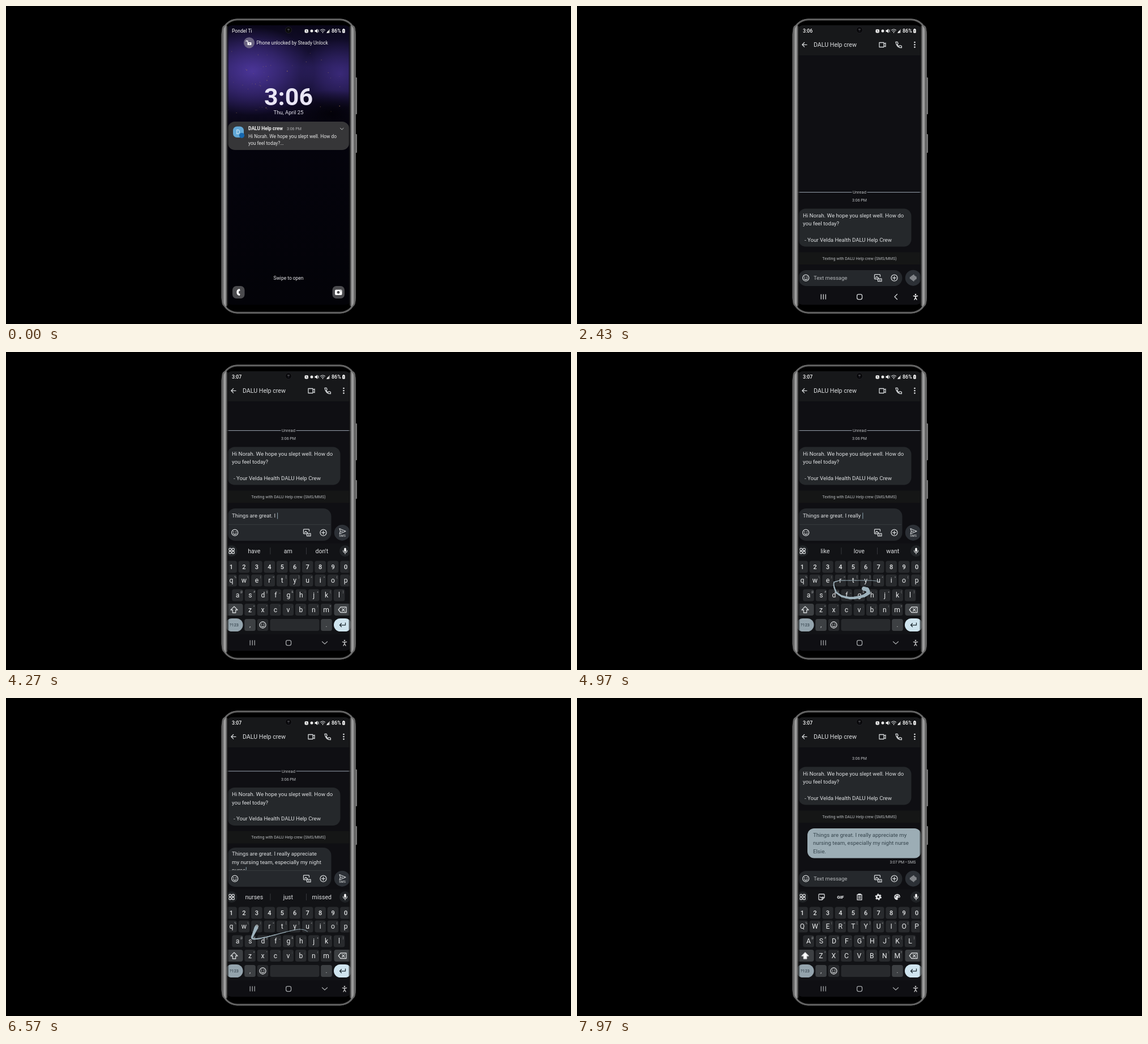
Animation, 998 px wide and 561 px high, one loop 8000 ms. Source, as an HTML page:

```html
<!DOCTYPE html>
<html lang="en">
<head>
<meta charset="utf-8">
<title>Care message</title>
<style>
  html, body { margin: 0; width: 100%; height: 100%; overflow: hidden; background: #000; }
  svg { display: block; width: 100vw; height: 100vh; }
  text { font-family: Roboto, Inter, sans-serif; white-space: pre; }
  .line { fill: none; stroke: #d5d8da; stroke-width: 1.3; stroke-linecap: round; stroke-linejoin: round; }
</style>
</head>
<body>
<svg id="stage" viewBox="0 0 998 561"></svg>
<script>
const LOOP = 8000;
const TEAM = 'DALU Help crew';
const INK = '#dfe1e3';
const BG = '#0f0f13';

// Drawing helpers; text is placed by its vertical middle.
const text = (x, y, s, size, fill = INK, anchor = 'start', more = '') =>
  `<text x="${x}" y="${y + size * 0.355}" font-size="${size}" fill="${fill}" text-anchor="${anchor}" ${more}>${s.replace(/&/g, '&amp;').replace(/</g, '&lt;')}</text>`;
const mid = (x, y, s, size, fill, more) => text(x, y, s, size, fill, 'middle', more);
const rect = (x, y, w, h, r, fill, more = '') =>
  `<rect x="${x}" y="${y}" width="${w}" height="${h}" rx="${r}" fill="${fill}" ${more}/>`;
const dot = (x, y, r, fill, more = '') => `<circle cx="${x}" cy="${y}" r="${r}" fill="${fill}" ${more}/>`;
const line = (d, more = '') => `<path class="line" d="${d}" ${more}/>`;
const solid = (d, fill = '#fff') => `<path d="${d}" fill="${fill}"/>`;
const group = (id, body, more = '') => `<g id="${id}" ${more}>${body}</g>`;
const at = (x, y, body) => `<g transform="translate(${x} ${y})">${body}</g>`;
const bold = 'font-weight="500"';

const smiley = line('M-5.5 0a5.5 5.5 0 1 0 11 0a5.5 5.5 0 1 0-11 0M-2.6 1.6q2.6 3 5.2 0') +
  dot(-2, -1.4, 0.9, INK) + dot(2, -1.4, 0.9, INK);
const handset = 'M-5-5h3l1.2 3-1.6 1.6a9 9 0 0 0 3.2 3.2l1.6-1.6 3 1.2v3q-9 0-10.4-10.4z';

function defs() {
  const stops = list => list.map(([o, c, a = 1]) =>
    `<stop offset="${o}" stop-color="${c}" stop-opacity="${a}"/>`).join('');
  const edge = [[0, '#3c3c3c'], [.2, '#6b6b6b'], [.36, '#a8a8a8'], [.58, '#858585'], [.8, '#1c1c1c', .75], [1, '#000', 0]];
  const glow = (id, c, a) => `<radialGradient id="${id}">${stops([[0, c, a], [.5, c, a * .55], [1, c, 0]])}</radialGradient>`;
  return `<defs>
    <linearGradient id="body">${stops([[0, '#444'], [.02, '#999'], [.05, '#5c5c5c'], [.5, '#555'], [.95, '#5c5c5c'], [.98, '#999'], [1, '#444']])}</linearGradient>
    <linearGradient id="edge">${stops(edge)}</linearGradient>
    <linearGradient id="night" x2="0" y2="1">${stops([[0, '#0a0719'], [.15, '#1b1440'], [.26, '#140e30'], [.38, '#04030c'], [1, '#030308']])}</linearGradient>
    ${glow('violet', '#5a40b4', .75)}${glow('shade', '#020106', .9)}
    <clipPath id="screen"><rect x="387" y="34" width="224" height="493" rx="13"/></clipPath>
    <clipPath id="composeClip"><rect x="392" y="240" width="182" height="63.5"/></clipPath>
  </defs>`;
}

function lockScreen() {
  let seed = 7;
  const rnd = () => (seed = seed * 16807 % 2147483647) / 2147483647;
  let stars = '';
  for (let i = 0; i < 46; i++) {
    const x = i < 32 ? 393 + 75 * rnd() : 470 + 135 * rnd();
    stars += dot(x, 80 + 112 * rnd(), 0.35 + 0.4 * rnd(), '#b08a58', `opacity="${0.3 + 0.6 * rnd()}"`);
  }
  const tile = x => rect(x, 494, 21.5, 22, 7, '#4b4b4e');
  return rect(387, 34, 224, 493, 0, 'url(#night)') +
    '<ellipse cx="435" cy="115" rx="110" ry="78" fill="url(#violet)"/>' +
    '<ellipse cx="590" cy="120" rx="70" ry="62" fill="url(#violet)" opacity=".65"/>' +
    '<ellipse cx="575" cy="190" rx="85" ry="42" fill="url(#shade)"/>' + stars +
    text(399, 44, 'Pondel Ti', 8.6, '#fff') +
    dot(429.5, 64.8, 9.6, '#77718b', 'opacity=".85"') + rect(426.5, 64, 7, 5, 1, '#fff') +
    line('M427 64v-2a2 2 0 0 0-3 0', 'style="stroke:#fff"') + dot(430, 66.5, .9, '#6b6680') +
    text(442.5, 65, 'Phone unlocked by Steady Unlock', 8.45, '#eee') +
    mid(499, 159.5, '3:06', 43, '#e9e6f5', 'font-weight="600"') +
    mid(499, 187.5, 'Thu, April 25', 9.5, '#e6e4ee') +
    rect(391.5, 204, 215, 50, 13, '#363638') +
    rect(401, 212.5, 19, 19.5, 7, '#62a8d6') + mid(410, 222, 'D', 10.5, '#e8f4fb') +
    dot(416.5, 228.3, 4.6, '#1667ae') +
    text(428, 216.5, TEAM, 8.45, '#f2f2f2', 'start', 'font-weight="700"') +
    text(496, 216.8, '3:06 PM', 7, '#b5b5b7') + line('M590.5 215.5l2.8 2.6 2.8-2.6', 'style="stroke-width:.9"') +
    text(428, 230, 'Hi Norah. We hope you slept well. How do', 8.45, '#e6e6e6') +
    text(428, 242, 'you feel today?...', 8.45, '#e6e6e6') +
    mid(499, 480.5, 'Swipe to open', 8.45, '#e6e6e8') +
    tile(400) + solid('M412.8 499q-5.5.5-5.5 6t5.5 6.2l.8-3.3-2.3-1q-.6-1.9 0-3.8l2.3-.9z') +
    tile(576.5) + rect(581, 500.5, 12.6, 9.5, 2, '#fff') + dot(587, 505.2, 2.4, '#4b4b4e') + dot(591.6, 502.5, .8, '#4b4b4e');
}

function conversation() {
  const rule = x => rect(x, 328, 97, 1.1, 0, '#8f98a3');
  return group('unread', rule(388.5) + rule(512.5) + mid(499, 328.6, 'Unread', 7.5, '#b9bcbf')) +
    mid(499, 343, '3:06 PM', 7, '#c3c6c8') +
    rect(391, 357.5, 199.5, 67, 13, '#25282b') +
    text(399, 369.5, 'Hi Norah. We hope you slept well. How do', 9.64) +
    text(399, 384, 'you feel today?', 9.64) +
    text(402, 412.5, `- Your Velda Health ${TEAM.replace('c', 'C')}`, 9.64) +
    rect(388, 434.5, 222, 21.5, 0, '#151616') +
    mid(499, 445, `Texting with ${TEAM} (SMS/MMS)`, 7.1, '#b7babd') +
    group('sent', rect(407, 466, 201, 52.5, 12, '#9cadb5') +
      ['Things are great. I really appreciate my', 'nursing team, especially my night nurse', 'Elsie.']
        .map((s, i) => text(417, 477.5 + 14.4 * i, s, 9.64, '#36454d')).join('') +
      text(598.5, 525.5, '3:07 PM • SMS', 7, '#c3c6c8', 'end'));
}

function header() {
  return rect(380, 20, 240, 67, 0, '#17181a') +
    line('M406 68.3h-8m3.6-3.8l-3.8 3.8 3.8 3.8') + text(418, 68.3, TEAM, 10.65) +
    line('M534 64.5h8v8h-8zM542 67l3-1.8v6.6l-3-1.8') +
    at(568, 68.3, line(handset)) +
    [64, 68.3, 72.6].map(y => dot(596.5, y, 1.3, INK)).join('');
}

function compose() {
  const wave = [3, 6, 9, 11, 7, 4].map((h, i) => `M${-5 + 2 * i} ${-h / 2}v${h}`).join('');
  return '<rect id="field" x="391" width="183.5" rx="14" fill="#25282c"/>' +
    group('draft', [0, 1, 2].map(() => text(399, 0, '', 9.64)).join('') + rect(0, 0, .8, 11, 0, '#a9c3d2', 'id="cursor"'),
      'clip-path="url(#composeClip)"') +
    group('controls', rect(393, -14.8, 180, .8, 0, '#3b3f42', 'id="divider"') +
      at(404.2, 0, smiley) +
      at(531.5, 0, line('M1-.2V1a1 1 0 0 1-1 1h-5a1 1 0 0 1-1-1v-6a1 1 0 0 1 1-1H3a1 1 0 0 1 1 1v2.5M-4 0l2-2.5 2 2M0 1.5h6.5v4.5H0z') + dot(3.3, 3.8, 1, INK)) +
      at(560.5, 0, line('M-5.5 0a5.5 5.5 0 1 0 11 0a5.5 5.5 0 1 0-11 0M-2.8 0h5.6M0-2.8v5.6')) +
      dot(593.8, 0, 14, '#2c3036') +
      group('hint', text(418, 0, 'Text message', 9.55, '#b5b8bb') + at(593.8, 0, line(wave, 'style="stroke-width:1"'))) +
      group('send', at(594, -2.5, line('M-5-4.6L6 0-5 4.6-3.5 0zM-3.5 0h4', 'style="stroke-width:1.1"')) + mid(594, 5.8, 'SMS', 5.6, INK)));
}

const ROWS = [
  ['1234567890', 398, 379, ''],
  ['qwertyuiop', 398, 403, '%\\|=[]<>{}'],
  ['asdfghjkl', 409, 429, '@#$_&-+()'],
  ['zxcvbnm', 431, 454.5, '*"\':;!?']
];
const keyAt = {};
ROWS.forEach(([keys, x, y]) => [...keys].forEach((k, i) => keyAt[k] = [x + 22.45 * i, y]));

function keyboard() {
  const box = (x, y, w = 19.6, fill = '#282a2d') => rect(x - w / 2, y - 10.5, w, 21, 3.5, fill);
  let keys = '';
  for (const [row, , , hints] of ROWS) {
    [...row].forEach((k, i) => {
      const [x, y] = keyAt[k];
      keys += `<g data-key="${k}">` + box(x, y) +
        mid(x, y, k, row[0] === '1' ? 11 : 12.2, '#e8eaeb', row[0] === '1' ? bold : 'class="letter"') +
        (hints ? mid(x + 7, y - 5.5, hints[i], 5, '#a9acae') : '') + '</g>';
    });
  }
  const icons =
    at(432, 351, line('M-5-4a1 1 0 0 1 1-1h8a1 1 0 0 1 1 1v5l-4 4h-5a1 1 0 0 1-1-1zM1 5V2q0-1 1-1h3M-2.5 0q2 2.4 4.5 0')) +
    mid(465.3, 351, 'GIF', 8, INK, 'font-weight="900"') +
    at(499, 351, line('M-4-4h8v9h-8zM-2-5.3h4v2h-4zM-2-.5h4M-2 2h4')) +
    at(532.3, 351, dot(0, 0, 3.1, 'none', 'stroke="#dfe1e3" stroke-width="2.6"') +
      dot(0, 0, 4.8, 'none', 'stroke="#dfe1e3" stroke-width="1.8" stroke-dasharray="2.5 2.53"')) +
    at(565.5, 351, solid('M0-5.3a5.3 5.3 0 1 0 0 10.6q2-.6 1-2.4T3 1.4q2.4 0 2.4-2Q5-5.3 0-5.3z', INK) +
      [[-3, -.3], [-1.4, -2.8], [1.5, -2.8], [3.2, -.5]].map(([x, y]) => dot(x, y, .9, BG)).join(''));
  return rect(387, 337.5, 224, 165, 0, '#121316') +
    dot(398.5, 351, 10, '#202326') + dot(599, 351, 10, '#202326') +
    [[-4.7, -4.7], [.7, -4.7], [-4.7, .7], [.7, .7]].map(([x, y]) => rect(398.5 + x, 351 + y, 4, 4, 1, 'none', 'stroke="#dfe1e3" stroke-width="1.2"')).join('') +
    at(599, 351, rect(-1.7, -5.5, 3.4, 7, 1.7, '#fff') + line('M-3.5-1q0 4 3.5 4t3.5-4M0 3v2.3', 'style="stroke-width:1.1"')) +
    group('tools', icons) +
    group('words', [438.3, 498.3, 557.8].map(x => mid(x, 351, '', 10.6, INK)).join('') +
      rect(466.5, 345, .8, 12, 0, '#3f4245') + rect(530, 345, .8, 12, 0, '#3f4245')) +
    keys +
    rect(388, 444, 30.5, 21, 4, '#3d4043') +
    '<path id="shift" class="line" d="M403 449l6 6h-3.3v5h-5.4v-5H397z"/>' +
    rect(579.5, 444, 31, 21, 4, '#3d4043') +
    line('M591 450h10v9.500h-10l-3.800-4.750zM593.600 452.600l4.400 4.400m0-4.400l-4.400 4.400') +
    rect(387.5, 470, 31, 23, 11.5, '#94a4ad') + mid(403, 481.500, '?123', 7.3, '#22303a') +
    box(431, 481.500, 19.6, '#3d4043') + mid(431, 481.500, ',', 11, INK) +
    box(453.500, 481.500) + at(453.500, 481.500, smiley) +
    box(510, 481.500, 87) + box(566, 481.500, 19.6, '#3d4043') + mid(566, 481.500, '.', 11, INK) +
    rect(579, 470, 31.5, 23, 11.5, '#cfe4ee') +
    line('M599.500 478v3.800h-10m3-3l-3 3 3 3', 'style="stroke:#1d2a31"') +
    group('trail', '', 'stroke="#9eb2bc" stroke-linecap="round"') +
    group('popup', dot(0, 0, 16.5, '#2b2d33') + mid(0, 0, '', 15.5, '#fff') +
      [-2.500, 0, 2.500].map(x => dot(x, 11, .7, '#ddd')).join(''));
}

function navBar() {
  return rect(387, 498, 224, 30, 0, BG, 'id="navBack"') +
    group('navIcons', line('M431.200 509v8M435.200 509v8M439.200 509v8') +
      rect(494.600, 508.600, 9, 9, 2.8, 'none', 'class="line"') +
      line('M565.500 508.500l-4.500 4.500 4.500 4.500', 'id="back"') + line('M558.500 511l4.500 4 4.500-4', 'id="hide"') +
      at(598, 513, dot(0, -4, 1.3, '#fff') + line('M-3.600-1.500L0-1l3.600-.500M0-1v2.500l-2 3.500M0 1.500l2 3.500', 'style="stroke:#fff;stroke-width:1.500"')));
}

function statusBar() {
  return group('clock', text(399, 44, '3:06', 8.7, '#fff', 'start', bold)) +
    dot(423, 44, 3, '#fff', 'id="notice"') +
    rect(527.500, 41, 6.500, 6.500, 2, '#e8e8e8') + line('M530.700 42.600v2l1.200.600', 'style="stroke:#111;stroke-width:.700"') +
    dot(540, 44, 2.500, '#e8e8e8') +
    solid('M545.500 42.500h2l2.500-2.300v7.600l-2.500-2.300h-2z') + line('M551 42l1.500 4m0-4l-1.500 4', 'style="stroke-width:.800"') +
    line('M555.500 42.700q4-3.300 8 0M557.200 44.700q2.300-1.900 4.600 0', 'style="stroke-width:1.100"') + dot(559.500, 46.600, .9, '#fff') +
    solid('M572 40.500v7h-6z', '#8e8e8e') + solid('M570 42.800v4.700h-4z') +
    text(575, 44, '86%', 9, '#fff', 'start', bold) +
    rect(594.200, 40.800, 4.500, 6.800, 1, '#fff') + rect(595.400, 40, 2, 1, 0, '#fff') + rect(596, 42.500, 1, 3, 0, '#333') +
    dot(499, 42.300, 5.500, '#08080a', 'stroke="#202024"') + rect(497, 40.500, 4, 1.200, .6, '#65656a') + dot(499, 43.500, 1.300, '#24242c');
}

const stage = document.getElementById('stage');
stage.innerHTML = defs() +
  rect(617, 126, 3, 65, 1, '#777') + rect(617, 226, 3, 33, 1, '#777') +
  rect(380.500, 22.500, 237.500, 520, 28, 'url(#body)') +
  rect(383.500, 25.500, 231.500, 514, 25, '#000') +
  '<g clip-path="url(#screen)">' +
    group('app', rect(380, 20, 240, 520, 0, BG) + group('talk', conversation()) + header() + compose()) +
    group('keyboard', keyboard()) + group('nav', navBar()) +
    group('lock', lockScreen()) + statusBar() +
  '</g>' +
  rect(381, 34, 13, 496, 8, 'url(#edge)') +
  `<g transform="translate(998.500 0) scale(-1 1)">${rect(381, 34, 13, 496, 8, 'url(#edge)')}</g>` +
  rect(381.500, 23.500, 235.500, 518, 27, 'none', 'stroke="#656565" stroke-width="2"');

const ui = {};
stage.querySelectorAll('[id]').forEach(el => ui[el.id] = el);
const letters = [...stage.querySelectorAll('.letter')].map(el => ({ el, key: el.textContent }));
const keyGroups = {};
stage.querySelectorAll('[data-key]').forEach(el => keyGroups[el.dataset.key] = el);
const draftLines = [...ui.draft.querySelectorAll('text')];
const wordSlots = [...ui.words.querySelectorAll('text')];
const popupLetter = ui.popup.querySelector('text');

// Glide typing: start, end, keys passed, text added, suggestions afterwards.
const GLIDES = [
  [3020, 3280, 'things', 'Things ', 'are have will'],
  [3400, 3600, 'are', 'are ', 'going good not'],
  [3660, 3900, 'great', 'great. ', 'I Thank How'],
  [4100, 4180, 'i', 'I ', "have am don't"],
  [4330, 4600, 'realy', 'really ', 'like love want'],
  [4700, 5080, 'apreciate', 'appreciate\n', 'it you the'],
  [5110, 5200, 'my', 'my ', 'friend time own'],
  [5230, 5400, 'nursing', 'nursing ', 'home team staff'],
  [5420, 5590, 'team', 'team, ', 'I and but'],
  [5670, 5960, 'especialy', 'especially ', 'the my when'],
  [6000, 6100, 'my', 'my ', 'nurse team family'],
  [6120, 6280, 'night', 'night\n', 'nurse shift team'],
  [6300, 6560, 'nuse', 'nurse', 'nurses just missed'],
  [6700, 7000, 'elsie', ' Elsie. ', 'I She Thank']
];
const PRESS = 80, SENT = 7400;

const ZOOM = [[1600, 1.28], [1700, 1.219], [2000, 1]];
const APP_ALPHA = [[1580, 0], [1700, .65], [1880, 1]];
const LOCK_ALPHA = [[1350, 1], [1600, 0]];
const RISE = [[2750, 0], [3000, 1]];
const TALK_Y = [[2750, 0], [3000, -161], [3280, -161], [3380, -190], [5080, -190], [5300, -197.5],
  [6000, -197.5], [6200, -199.5], [6570, -199.5], [6750, -207], [SENT, -207], [7600, -236]];
const FIELD_TOP = [[3280, 305], [3380, 276], [5080, 276], [5300, 268], [6000, 268], [6200, 264],
  [6570, 264], [6750, 250], [SENT, 250], [7500, 305]];

function track(steps, t) {
  const i = steps.findIndex(s => s[0] > t);
  if (i === 0) return steps[0][1];
  if (i < 0) return steps[steps.length - 1][1];
  const [[t0, a], [t1, b]] = [steps[i - 1], steps[i]];
  const p = (t - t0) / (t1 - t0);
  return a + (b - a) * p * p * (3 - 2 * p);
}

const set = (el, name, value) => el.setAttribute(name, value);
const show = (el, on) => set(el, 'visibility', on ? 'inherit' : 'hidden');
const write = (el, s) => { if (el.textContent !== s) el.textContent = s; };

// Point along a run of keys, averaged so that corners become round.
function glidePoint(keys, p) {
  let x = 0, y = 0;
  for (let k = -2; k <= 2; k++) {
    const q = Math.min(1, Math.max(0, p + k * .04)) * (keys.length - 1);
    const i = Math.min(keys.length - 2, Math.floor(q));
    const a = keyAt[keys[i]], b = keyAt[keys[i + 1]];
    x += (a[0] + (b[0] - a[0]) * (q - i)) / 5;
    y += (a[1] + (b[1] - a[1]) * (q - i)) / 5;
  }
  return [x, y];
}

function drawGlide(t) {
  const press = GLIDES.find(g => t >= g[0] && t < g[0] + PRESS);
  show(ui.popup, press);
  for (const k in keyGroups) set(keyGroups[k], 'opacity', press && press[2][0] === k ? .3 : 1);
  if (press) {
    const [x, y] = keyAt[press[2][0]];
    write(popupLetter, press[2][0]);
    set(ui.popup, 'transform', `translate(${x} ${y - 29})`);
  }
  const glide = GLIDES.find(g => g[2].length > 1 && t >= g[0] + PRESS && t < g[1] + 110);
  let body = '';
  if (glide) {
    const [start, end, keys] = glide;
    const span = end - start - PRESS;
    const head = (t - start - PRESS) / span, tail = head - 140 / span;
    const N = 26;
    for (let i = 0; i < N; i++) {
      const a = tail + (head - tail) * i / N, b = tail + (head - tail) * (i + 1) / N;
      if (b <= 0 || a >= 1) continue;
      const [x1, y1] = glidePoint(keys, a), [x2, y2] = glidePoint(keys, b);
      body += `<path d="M${x1} ${y1}L${x2} ${y2}" stroke-width="${.8 + 7 * (i / N) ** 2}"/>`;
    }
  }
  ui.trail.innerHTML = body;
}

function drawDraft(t, top) {
  const done = t < SENT ? GLIDES.filter(g => t >= g[1]) : [];
  const draft = done.map(g => g[3]).join('');
  const lines = draft.split('\n');
  const first = top + (lines.length > 1 ? 11 : 13);
  draftLines.forEach((el, i) => {
    write(el, lines[i] || '');
    set(el, 'y', first + 14.4 * i + 3.4);
  });
  const last = lines.length - 1;
  set(ui.cursor, 'x', 399.8 + draftLines[last].getComputedTextLength());
  set(ui.cursor, 'y', first + 14.4 * last - 5.5);

  const typing = draft !== '';
  for (const el of [ui.draft, ui.divider, ui.send, ui.words]) show(el, typing);
  for (const el of [ui.hint, ui.tools]) show(el, !typing);
  if (typing) done[done.length - 1][4].split(' ').forEach((w, i) => write(wordSlots[i], w));
  const upper = !typing || draft.endsWith('. ');
  for (const { el, key } of letters) write(el, upper ? key.toUpperCase() : key);
  ui.shift.style.fill = upper ? '#fff' : 'none';
}

function render(t) {
  const zoom = track(ZOOM, t), rise = track(RISE, t), locked = track(LOCK_ALPHA, t);
  set(ui.lock, 'opacity', locked);
  set(ui.app, 'opacity', track(APP_ALPHA, t));
  set(ui.app, 'transform', `translate(499 276) scale(${zoom}) translate(-499 -276)`);
  set(ui.talk, 'transform', `translate(0 ${track(TALK_Y, t)})`);
  show(ui.unread, t < SENT);
  show(ui.sent, t >= SENT);
  set(ui.sent, 'opacity', track([[SENT, 0], [7550, 1]], t));

  const shift = 161 * (1 - rise), top = track(FIELD_TOP, t) + shift;
  set(ui.field, 'y', top);
  set(ui.field, 'height', 333 + shift - top);
  set(ui.controls, 'transform', `translate(0 ${318.7 + shift})`);
  drawDraft(t, top);

  show(ui.keyboard, rise > 0);
  set(ui.keyboard, 'transform', `translate(0 ${165 * (1 - rise)})`);
  drawGlide(t);

  show(ui.nav, locked < .5);
  show(ui.navBack, t > 1950);
  set(ui.navIcons, 'opacity', 1 - .25 * rise);
  show(ui.back, rise < .5);
  show(ui.hide, rise >= .5);
  show(ui.clock, locked < .5);
  show(ui.notice, locked < .5 && t < 1950);
  write(ui.clock.firstChild, t < 3400 ? '3:06' : '3:07');
}

const begin = performance.now();
function frame() {
  render((performance.now() - begin) % LOOP);
  requestAnimationFrame(frame);
}
frame();
</script>
</body>
</html>
```
